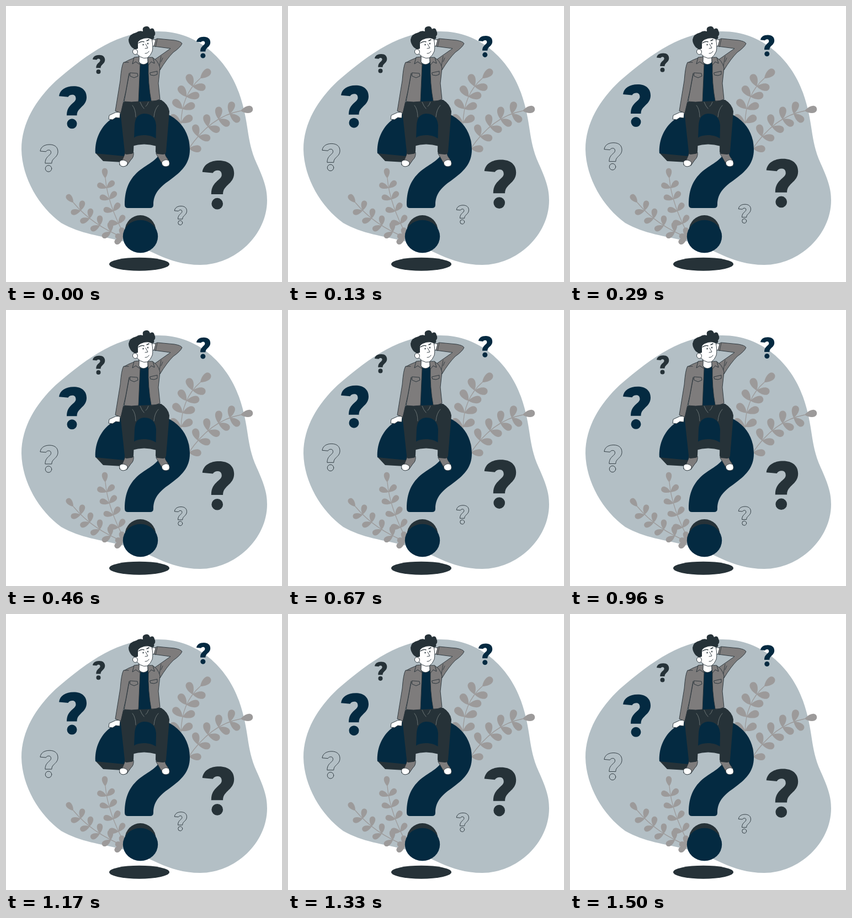
An HTML page with a canvas that plays this animation: 500 by 500 pixels, repeating every 1.54 s.

```html
<!DOCTYPE html>
<html lang="en">
<head>
<meta charset="utf-8">
<title>Man on a question mark</title>
<style>
html, body { margin: 0; width: 100%; height: 100%; overflow: hidden; background: #fff; }
canvas { display: block; width: 500px; height: 500px; }
</style>
</head>
<body>
<canvas id="stage"></canvas>
<script>
const canvas = document.getElementById('stage');
const ctx = canvas.getContext('2d');
const ratio = window.devicePixelRatio || 1;
canvas.width = canvas.height = 500 * ratio;

const NAVY = '#042a41', DARK = '#263238', GREY = '#7e7c7c', LEAF = '#9c9a9a', BLOB = '#b3bfc5', WHITE = '#fff';
const LOOP = 1540, STEPS = 37, RISE = 10;

function shape(d, fill, line, width = 0.9) {
  const path = new Path2D(d);
  if (fill) { ctx.fillStyle = fill; ctx.fill(path); }
  if (line) { ctx.strokeStyle = line; ctx.lineWidth = width; ctx.stroke(path); }
}

function oval(x, y, rx, ry, fill, line, angle = 0) {
  ctx.beginPath();
  ctx.ellipse(x, y, rx, ry, angle, 0, Math.PI * 2);
  if (fill) { ctx.fillStyle = fill; ctx.fill(); }
  if (line) { ctx.strokeStyle = line; ctx.lineWidth = 0.9; ctx.stroke(); }
}

function background() {
  ctx.fillStyle = WHITE;
  ctx.fillRect(0, 0, 500, 500);
  shape('M272 46C345 44 400 95 422 157C442 214 434 240 454 285C470 320 473 335 473 352C473 415 415 469 352 469' +
    'C290 469 260 437 215 427C170 416 135 413 100 393C60 364 29 312 28 260C28 212 54 170 90 136C150 84 205 46 272 46Z', BLOB);
}

function leaf(x, y, angle, size) {
  ctx.save();
  ctx.translate(x, y);
  ctx.rotate(angle);
  ctx.scale(size, size);
  shape('M0 0C.26-.22 .58-.34 .81-.3C1.16-.24 1.16 .24 .81 .3C.58 .34 .26 .22 0 0Z', LEAF);
  ctx.restore();
}

// Curved stem with pairs of leaves and one at the tip
function plant(from, bend, to, pairs, size) {
  const spread = 1.01;
  const point = (t, k) => (1 - t) ** 2 * from[k] + 2 * t * (1 - t) * bend[k] + t * t * to[k];
  const slope = (t, k) => (1 - t) * (bend[k] - from[k]) + t * (to[k] - bend[k]);
  const heading = t => Math.atan2(slope(t, 1), slope(t, 0));
  shape(`M${from}Q${bend} ${to}`, null, LEAF, 1.3);
  for (let i = 0; i < pairs; i++) {
    const t = (i + 0.08) / pairs;
    for (const side of [-1, 1]) leaf(point(t, 0), point(t, 1), heading(t) + side * spread, size);
  }
  leaf(...to, heading(1), size);
}

function plants() {
  plant([317, 214], [318, 160], [352, 131], 4, 22);
  plant([330, 260], [370, 200], [425, 190], 5, 21);
  plant([217, 420], [184, 359], [180, 312], 5, 17);
  plant([214, 420], [156, 397], [122, 356], 5, 17);
}

const HOOK = new Path2D('M0 36C3 13 24 0 53 0C82 0 100 15 100 40C100 57 91 67 80 77C71 86 65 92 65 106H28' +
  'C28 83 37 74 47 64C55 57 61 52 61 45C61 36 56 31 49 31C41 31 36 34 33 39Z');
HOOK.moveTo(65, 136);
HOOK.arc(47, 136, 18, 0, Math.PI * 2);

function mark(x, y, width, color, outlined) {
  const k = width / 100;
  ctx.save();
  ctx.translate(x, y);
  ctx.scale(k, k);
  ctx.fillStyle = ctx.strokeStyle = color;
  ctx.lineWidth = 0.9 / k;
  if (outlined) ctx.stroke(HOOK);
  else ctx.fill(HOOK);
  ctx.restore();
}

function floatingMarks() {
  mark(96, 145.3, 50, NAVY);
  mark(355.7, 280, 57.5, DARK);
  mark(157, 88.7, 22.3, DARK);
  mark(345, 55.7, 25.2, NAVY);
  mark(62, 251, 32, DARK, true);
  mark(305.3, 362.5, 22.2, DARK, true);
}

function seat() {
  oval(241.5, 467.7, 54.5, 12, DARK);
  oval(243.5, 407, 28, 28, DARK);
  oval(243.5, 417.5, 31.7, 29.8, NAVY);
  // Inner thickness, then the front face
  shape('M162 266L176 281L211 283L216 270L228 254Q250 247 273 254L280 242L250 225L208 255Z', DARK);
  shape('M162 267C160 222 193 188 249 187C300 187 333 217 333 260C333 286 318 300 296 316' +
    'C277 329 267 341 267 360Q267 366 261 366H221Q215 366 215 360C215 331 224 312 243 297' +
    'C262 283 280 276 281 258C281 244 269 234 250 234C227 234 216 250 214 272Z', NAVY);
}

function shoes() {
  shape('M216 267L231 265Q232 274 226 279L219 289Q212 292 206 288Q205 282 211 278Z', GREY, DARK);
  shape('M206 281Q213 276 220 283Q221 290 212 291Q204 290 206 281Z', WHITE, DARK);
  shape('M272 267L287 265Q289 273 293 277Q297 283 295 290L284 288Z', GREY, DARK);
  shape('M282 283Q288 276 295 280Q299 290 290 291Q282 291 282 283Z', WHITE, DARK);
}

function trousers() {
  shape('M217 171L281 170Q294 178 296 191L290 264Q289 269 284 269L274 268Q271 267 271 263L272 216' +
    'Q270 195 250 195Q234 196 233 216L231 263Q231 268 226 268L218 269Q215 268 215 264L207 190Q207 177 217 171Z', DARK);
  shape('M229 180Q235 187 235 201M243 174Q246 182 250 186M258 174Q256 180 253 182M276 180Q269 187 268 201', null, '#87908f', 0.7);
}

function jacket() {
  shape('M207 192L206 203L199 202L193 206L186 205L187 198L198 193Z', WHITE, DARK);
  shape('M242 102L259 101L264 172L240 173Z', NAVY);
  // Raised arm
  shape('M268 62L274 59L305 62Q317 64 319 68Q316 75 303 84Q291 96 279 116L268 98L298 77L268 73Z', GREY, DARK);
  shape('M281 91L278 108M284 94L281 101M274 60L271 74', null, DARK, 0.8);
  // Front panels, then the lowered sleeve
  shape('M232 94Q221 98 213 103L223 124L214 173Q228 175 240 173L243 106Z', GREY, DARK);
  shape('M258 104L266 94Q275 98 279 112L276 140L279 169Q271 173 263 172Q257 140 258 104Z', GREY, DARK);
  shape('M222 102L213 102Q209 108 207 135L198 190L208 194L217 155L223 122', GREY, DARK);
  // Pockets
  shape('M225 121L238 122L239 127L232 130L225 127ZM261 121L274 118L274 124L268 126L262 125Z', null, DARK);
  // Neck and collar
  shape('M241 90L257 91L257 102Q249 110 241 102Z', WHITE, DARK);
  shape('M241 92L232 93L229 105L235 101L244 107L241 101ZM257 93L266 93L269 104L263 101L258 107Z', GREY, DARK);
}

function head() {
  shape('M262 63Q267 59 271 62L268 73L262 71Z', WHITE, DARK);
  shape('M238 64Q250 55 264 59Q267 73 265 82Q262 90 256 94Q250 96 243 92L232 82Z', WHITE, DARK);
  shape('M234 79L228 75Q222 68 222 61Q223 51 236 48Q241 44 248 46Q246 38 253 37Q259 36 261 42' +
    'Q267 38 269 45Q272 51 268 55Q270 61 263 60Q256 56 249 59Q241 61 239 66L239 77Z', DARK);
  oval(234, 83, 4.4, 5, WHITE, DARK, -0.4);
  shape('M240 67Q246 63 250 65M255 63L259 61', null, DARK, 1.4);
  oval(248.5, 70, 1, 1.6, DARK);
  oval(257, 68, 1, 1.5, DARK);
  shape('M253 69L257 76L252 77M252 86Q257 86 259 82', null, DARK);
}

// Linear rise and fall, one step per picture
function lift(time) {
  const step = Math.floor((time % LOOP) / LOOP * STEPS);
  const phase = ((step + 1) % STEPS) / STEPS;
  return RISE * (1 - Math.abs(1 - 2 * phase)) - 2 * RISE / STEPS;
}

function draw(time) {
  ctx.setTransform(ratio, 0, 0, ratio, 0, 0);
  ctx.lineJoin = ctx.lineCap = 'round';
  background();
  plants();
  ctx.save();
  ctx.translate(0, -lift(time));
  floatingMarks();
  ctx.restore();
  seat();
  shoes();
  trousers();
  jacket();
  head();
}

const start = performance.now();
function tick() {
  draw(performance.now() - start);
  requestAnimationFrame(tick);
}
tick();
</script>
</body>
</html>
```
